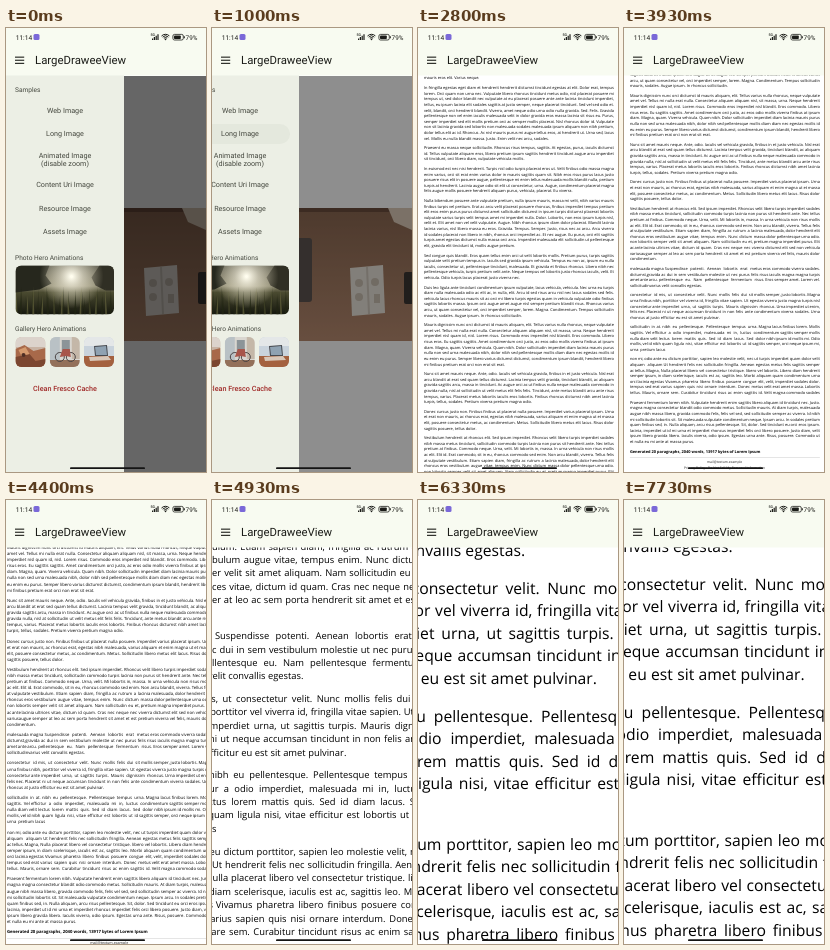
Animation of 200 by 444 pixels, one loop 7.87 s. Source, as an HTML page with a canvas:

```html
<!DOCTYPE html>
<html lang="en">
<head>
<meta charset="utf-8">
<title>LargeDraweeView</title>
<style>
html, body { margin: 0; width: 100%; height: 100%; overflow: hidden; background: #fff; }
canvas { display: block; width: 200px; height: 444px; }
</style>
</head>
<body>
<canvas id="stage"></canvas>
<script>
const W = 200, H = 444, LOOP = 7870, BAR = 47;
const canvas = document.getElementById('stage');
const ctx = canvas.getContext('2d');
const dpr = window.devicePixelRatio || 1;
canvas.width = W * dpr;
canvas.height = H * dpr;
ctx.textRendering = 'geometricPrecision';

const UI = 'Roboto, "Noto Sans", sans-serif';
const BODY = '"Open Sans", "Noto Sans", sans-serif';
const LEFT = 21, RIGHT = 697, MID = 358, LINE = 20, FIRST = 183;
const FIT = 0.281, ZOOM = 1.1225, ZOOM_X = -203, FOCUS_Y = 3063;

// ---------- helpers ----------
const clamp01 = v => Math.max(0, Math.min(1, v));
const lerp = (a, b, u) => a + (b - a) * u;
const span = (t, a, b) => clamp01((t - a) / (b - a));
const ease = {
  in: u => u ** 1.5,
  out: u => 1 - (1 - u) ** 2,
  fling: u => 1 - (1 - u) ** 3,
  both: u => u * u * (3 - 2 * u)
};

function rect(x, y, w, h, color, r = 0) {
  ctx.fillStyle = color;
  ctx.beginPath();
  ctx.roundRect(x, y, w, h, r);
  ctx.fill();
}
function poly(color, ...p) {
  ctx.fillStyle = color;
  ctx.beginPath();
  for (let i = 0; i < p.length; i += 2) ctx.lineTo(p[i], p[i + 1]);
  ctx.fill();
}
function disc(x, y, r, color) {
  ctx.fillStyle = color;
  ctx.beginPath();
  ctx.arc(x, y, r, 0, 7);
  ctx.fill();
}
function label(text, x, y, font, color, align = 'left') {
  ctx.font = font;
  ctx.fillStyle = color;
  ctx.textAlign = align;
  ctx.fillText(text, x, y);
}
function clipped(x, y, w, h, r, draw) {
  ctx.save();
  ctx.beginPath();
  ctx.roundRect(x, y, w, h, r);
  ctx.clip();
  ctx.translate(x, y);
  draw(w, h);
  ctx.restore();
}

// ---------- long page ----------
const counts = [4, 9, 4, 11, 7, 8, 4, 7, 6, 10, 3, 5, 9, 5, 6, 8, 6, 4, 10, 4, 5, 5, 7, 8];
const openers = ['', 'Suspendisse tincidunt arcu nunc, at', 'Nulla quis elit nibh. Morbi cursus',
  'Aenean feugiat sem ac arcu', 'Morbi dolor lacus, hendrerit a', 'In non ex ac est', 'Cras at augue ut ipsum',
  'Proin cras ante, feugiat', 'Praesent a lectus a libero', 'In fringilla egestas eget', 'Praesent eu massa neque',
  'In euismod est nec nisi', 'Nulla bibendum posuere ante', 'Sed congue quis', 'Duis leo ligula', 'Mauris dignissim nunc',
  'Nunc sit amet mauris', 'Donec cursus justo', 'Vestibulum hendrerit', '', '', '', '', 'Praesent fermentum lorem'];
const intro = [
  'Lorem ipsum dolor sit amet, consectetur adipiscing elit. Morbi et quam ac quam dignissim semper vel et',
  'eros. Aenean arcu leo, convallis at tincidunt ac, lobortis et nisi. Nulla vel risus risus non risus semper',
  'imperdiet. Integer tristique elit justo. Quisque eu blandit felis. Pellentesque a dolor id enim finibus',
  'imperdiet. Donec aliquam velit quam, in pretium purus malesuada id.'];

// paragraph: [first line, ...'x | extra word gap | text'], x is where "~" sits at full zoom
const known = {
  18: [4,
    '-45|1.5|vestib~ulum. Etiam sapien diam, fringilla ac rutrum a',
    '-45|1.8|vesti~bulum augue vitae, tempus enim. Nunc dictum',
    '-45|1.2|semp~er velit sit amet aliquam. Nam sollicitudin eu',
    '-45|1.2|ultri~ces vitae, dictum id quam. Cras nec neque nec',
    '-45|.7|semp~er at leo ac sem porta hendrerit sit amet et est'],
  19: [0,
    '-40|6.3|~Suspendisse potenti. Aenean lobortis erat',
    '-45|1|a~c dui in sem vestibulum molestie ut nec purus',
    '-45|6|pe~llentesque eu. Nam pellentesque fermentum',
    '-52|0|~velit convallis egestas.'],
  20: [0,
    '-46|3.3|mi~s, ut consectetur velit. Nunc mollis felis dui',
    '-48|.6|~porttitor vel viverra id, fringilla vitae sapien. Ut',
    '-53|2.8|~imperdiet urna, ut sagittis turpis. Mauris dignissim',
    '-50|1.2|~ni ut neque accumsan tincidunt in non felis',
    '-56.5|.2|~efficitur eu est sit amet pulvinar.'],
  21: [0,
    '-50|4|~nibh eu pellentesque. Pellentesque tempus',
    '-50|4.8|efficit~ur a odio imperdiet, malesuada mi in, luctus',
    '-51|4|le~ctus lorem mattis quis. Sed id diam lacus. Sed',
    '-51|1.9|~quam ligula nisi, vitae efficitur est lobortis ut',
    '-45|0|lacu~s'],
  22: [0,
    '-49|.7|~eu dictum porttitor, sapien leo molestie velit,',
    '-45|.7|~Ut hendrerit felis nec sollicitudin fringilla. Aenean',
    '-56|.6|~Nulla placerat libero vel consectetur tristique.',
    '-50|1.4|~diam scelerisque, iaculis est ac, sagittis leo. Morbi',
    '-38.6|2.7|~Vivamus pharetra libero finibus posuere congue',
    '-48|2.4|v~arius sapien quis nisi ornare interdum. Donec',
    '-46|1.8|orn~are sem. Curabitur tincidunt risus ac enim sagittis']
};
const words = ('ac at eu et id in mi nec non sed sit ut vel amet ante arcu diam elit enim erat eros nibh nisl odio orci ' +
  'quam urna dolor felis ipsum justo lacus lorem magna massa metus neque nulla purus risus velit augue libero mauris ' +
  'mollis semper tellus tempus turpis varius viverra aliquam blandit commodo egestas finibus gravida iaculis lacinia ' +
  'posuere pretium rhoncus sodales dictumst imperdiet vehicula lobortis placerat sagittis tincidunt vulputate ' +
  'consectetur condimentum pellentesque malesuada hendrerit sollicitudin').split(' ');

let seed = 41;
const rnd = () => (seed = (seed * 16807) % 2147483647) / 2147483647;
const cap = s => s[0].toUpperCase() + s.slice(1);
const width = s => ctx.measureText(s).width;
const gaps = s => Math.max(1, s.split(' ').length - 1);

// random words that fit a width with the least stretching
function fill(w, head) {
  let best = '', bestGap = 1e9;
  for (let n = 0; n < 12; n++) {
    let s = head || '', start = false;
    for (;;) {
      let word = words[Math.floor(rnd() * words.length)];
      if (start) word = cap(word);
      const r = rnd();
      start = r < 0.12;
      if (start) word += '.';
      else if (r < 0.22) word += ',';
      const next = s ? s + ' ' + word : word;
      if (s && width(next) > w + 4) break;
      s = next;
    }
    const gap = Math.abs(w - width(s)) / gaps(s);
    if (gap < bestGap) { best = s; bestGap = gap; }
  }
  return best;
}

const pieces = [];
function put(text, x, y, gap = 0) { pieces.push({ text, x, y, gap }); }
function justify(text, x, y, w) { put(text, x, y, (w - width(text)) / gaps(text)); }

function knownLine(entry, y, last) {
  const [x, g, marked] = entry.split('|');
  const text = marked.replace('~', ''), gap = g / ZOOM;
  const x0 = (x - ZOOM_X) / ZOOM - width(marked.split('~')[0]);
  const x1 = x0 + width(text) + gap * (gaps(text) + 1) + 4;
  const lead = x0 - 4 - LEFT;
  if (lead > 12) justify(fill(lead), LEFT, y, lead);
  put(text, x0, y, gap);
  if (!last) justify(fill(RIGHT - x1), x1, y, RIGHT - x1);
}

function layout() {
  ctx.font = '14px ' + BODY;
  let y = FIRST;
  counts.forEach((n, p) => {
    for (let i = 0; i < n; i++, y += LINE) {
      const last = i === n - 1, k = known[p];
      const entry = k && i >= k[0] && k[1 + i - k[0]];
      if (entry) knownLine(entry, y, last && p !== 22);
      else if (p === 0 && !last) justify(intro[i], LEFT, y, RIGHT - LEFT);
      else if (p === 0) put(intro[i], LEFT, y);
      else if (last) {
        const w = p === 18 ? 90 : 150 + rnd() * 420;
        put(fill(w).replace(/[,.]$/, '') + '.', LEFT, y);
      } else justify(fill(RIGHT - LEFT, i ? '' : openers[p]), LEFT, y, RIGHT - LEFT);
    }
    y += 14;
  });
  return y;
}
const endY = layout();

// time, scale, x, y, easing towards this key
const at = (y, k) => y - k * FOCUS_Y;
const keys = [
  [1930, FIT, 0, BAR, 'both'],
  [2800, FIT, 0, BAR - 410, 'fling'],
  [2870, FIT, 0, BAR - 410, 'both'],
  [3500, FIT, 0, at(268.3, FIT), 'both'],
  [4270, FIT, 0, at(268.3, FIT), 'both'],
  [4930, 0.668, -94, at(202.3, 0.668), 'in'],
  [5600, ZOOM, ZOOM_X - 2.5, at(96, ZOOM), 'out'],
  [5900, ZOOM, ZOOM_X - 2.5, at(96, ZOOM), 'both'],
  [7000, ZOOM, ZOOM_X, at(90, ZOOM), 'both']
];
function camera(t) {
  let i = 0;
  while (i < keys.length - 1 && t >= keys[i + 1][0]) i++;
  const a = keys[i], b = keys[Math.min(i + 1, keys.length - 1)];
  const u = a === b ? 0 : ease[b[4]](span(t, a[0], b[0]));
  const k = a[1] * (b[1] / a[1]) ** u;
  const v = a[1] === b[1] ? u : (k - a[1]) / (b[1] - a[1]);
  return { k, x: lerp(a[2], b[2], v), y: lerp(a[3], b[3], v) };
}

function drawPage(t) {
  const c = camera(t);
  ctx.save();
  rect(0, BAR, W, H - BAR, '#fff');
  ctx.translate(c.x, c.y);
  ctx.scale(c.k, c.k);
  const ink = '#000';
  label('Lorem Ipsum', MID, 64, '64px "Liberation Serif", serif', ink, 'center');
  label('"Neque porro quisquam est qui dolorem ipsum quia dolor sit amet, consectetur, adipisci velit..."',
    MID, 112, 'italic 14px ' + BODY, ink, 'center');
  label('"There is no one who loves pain itself, who seeks after it and wants to have it, simply because it is pain..."',
    MID, 136, '11px ' + BODY, ink, 'center');
  rect(LEFT, 150, RIGHT - LEFT, 2, '#ccc');
  ctx.font = '14px ' + BODY;
  ctx.textAlign = 'left';
  ctx.fillStyle = ink;
  for (const p of pieces) {
    const y = c.y + p.y * c.k;
    if (y < BAR - 10 || y > H + 20) continue;
    ctx.wordSpacing = p.gap + 'px';
    ctx.fillText(p.text, p.x, p.y);
  }
  ctx.wordSpacing = '0px';
  label('Generated 20 paragraphs, 2040 words, 13917 bytes of Lorem Ipsum', LEFT, endY, 'bold 14px ' + BODY, ink);
  rect(LEFT, endY + 16, RIGHT - LEFT, 2, '#ccc');
  label('mail@textum.example', MID, endY + 37, '12px ' + BODY, '#222', 'center');
  label('Privacy Policy · Do Not Sell My Personal Information', MID, endY + 58, '12px ' + BODY, '#222', 'center');
  ctx.restore();
}

// ---------- first screen ----------
function drawDesk() {
  rect(0, BAR, W, H - BAR, '#fff');
  clipped(0, 180, W, 133, 0, (w, h) => {
    const g = ctx.createLinearGradient(0, 0, 0, h);
    g.addColorStop(0, '#8a6650');
    g.addColorStop(1, '#b98c70');
    rect(0, 0, w, h, g);
    rect(0, 0, w, 4, '#6b4c3c');
    rect(20, 30, 80, 64, '#5c5350', 3);
    poly('#e9e3da', 138, 60, 171, 57, 173, 105, 140, 108);
    poly('#cfc7bc', 154, 59, 156, 59, 158, 106, 156, 106);
    disc(147, 75, 4, '#cabfb2');
    disc(147, 89, 4, '#cabfb2');
    disc(163, 74, 4, '#cabfb2');
    rect(162, 86, 6, 9, '#cabfb2');
    rect(192, 64, 10, 32, '#3a3432', 2);
    poly('#dccbb8', 176, 0, 200, 0, 200, 22, 182, 14);
  });
}

function drawMeadow(w, h) {
  const g = ctx.createLinearGradient(0, 0, 0, h);
  g.addColorStop(0, '#57564a');
  g.addColorStop(0.42, '#8c8871');
  g.addColorStop(0.55, '#4a4a30');
  g.addColorStop(1, '#15170e');
  rect(0, 0, w, h, g);
  poly('#26271d', 0, 0, 34, 0, 30, 10, 36, 18, 24, 24, 0, 27);
  poly('#302f24', w, 0, 84, 0, 76, 12, 80, 20, 90, 25, w, 25);
  const sun = ctx.createRadialGradient(56, 11, 1, 56, 11, 32);
  sun.addColorStop(0, 'rgba(255,253,238,1)');
  sun.addColorStop(0.35, 'rgba(245,240,220,.6)');
  sun.addColorStop(1, 'rgba(240,232,200,0)');
  rect(0, 0, w, h, sun);
  for (let i = 0; i < 34; i++) {
    const x = i * 3 + Math.sin(i * 9) * 2, top = 26 + 5 * Math.sin(i * 5);
    poly(i % 3 ? '#23261580' : '#7c7a4a80', x, h, x + 1 + Math.sin(i), top, x + 2, h);
  }
}
function drawCanyon(w, h) {
  rect(0, 0, w, h, '#c8b3a4');
  rect(0, 0, w, 10, '#dcd3cc');
  poly('#a8694a', 0, 12, 9, 8, 18, 14, w, 11, w, h, 0, h);
  poly('#7b4630', 0, 20, 14, 17, 20, 24, w, 22, w, h, 0, h);
  poly('#d59a6e', 3, 13, 10, 10, 14, 17, 6, 19);
  disc(8, 18, 2, '#4f2f25');
}
function drawBike(w, h) {
  rect(0, 0, w, h, '#d9d6d0');
  rect(0, 0, 10, 24, '#b9c1c5');
  rect(12, 3, 8, 13, '#8c9498');
  rect(22, 0, 8, 22, '#c4b7a8');
  rect(0, 23, w, 7, '#93705a');
  ctx.strokeStyle = '#4a4444';
  ctx.lineWidth = 1;
  for (const x of [10, 21]) {
    ctx.beginPath();
    ctx.arc(x, 20, 4.5, 0, 7);
    ctx.stroke();
  }
  poly('#a8554a', 10, 20, 13, 12, 20, 12, 21, 20, 16, 19);
}
function drawLaptop(w, h) {
  rect(0, 0, w, h, '#c9d3dc');
  rect(0, 0, w, 9, '#e4e7e8');
  rect(0, 19, w, 11, '#a4613f');
  poly('#474a50', 10, 9, 23, 8, 24, 19, 11, 19);
  poly('#8fa2b2', 11, 10, 22, 9, 23, 18, 12, 18);
  poly('#d8c7b8', 5, 20, 24, 19, 27, 23, 6, 24);
}

const items = [['Web Image', 84.6], ['Long Image', 108.2], ['Animated Image', 129.6], ['(disable zoom)', 137.8],
  ['Content Uri Image', 159.4], ['Resource Image', 183], ['Assets Image', 206.4]];

function drawDrawer(t) {
  const u = ease.both(span(t, 870, 1260));
  if (u >= 1) return;
  rect(0, BAR + 1, W, H, `rgba(0,0,0,${0.6 * (1 - u)})`);
  ctx.save();
  ctx.translate(-118 * u, 0);
  rect(0, BAR, 118, H - BAR, '#ecefe5');
  const press = span(t, 640, 800) * (1 - span(t, 880, 1100));
  if (press) rect(9, 96, 100, 20, `rgba(60,70,50,${0.1 * press})`, 10);
  const head = '6.6px ' + UI, body = '7.2px ' + UI, ink = '#45483f';
  label('Samples', 9, 64, head, ink);
  for (const [text, y] of items) label(text, 59, y, body, ink, 'center');
  label('Photo Hero Animations', 9, 231.6, head, ink);
  clipped(9.5, 237.5, 98.5, 49, 6, drawMeadow);
  label('Gallery Hero Animations', 9, 303.2, head, ink);
  clipped(9.5, 309, 30, 30, 6, drawCanyon);
  clipped(43.8, 309, 30, 30, 6, drawBike);
  clipped(78, 309, 30, 30, 6, drawLaptop);
  label('Clean Fresco Cache', 59, 362.6, '500 7.2px ' + UI, '#a02a28', 'center');
  ctx.restore();
}

function drawBars() {
  const ink = '#1b1c18';
  rect(0, 0, W, BAR + 0.5, '#f8fbf1');
  label('11:14', 9.7, 11.5, '6.6px ' + UI, ink);
  rect(27.5, 6, 6, 6, '#7a68d8', 1.5);
  label('5G', 144.5, 8.4, '500 3.6px ' + UI, ink);
  for (let i = 0; i < 4; i++) rect(146 + i * 1.8, 10.5 - i * 1.4, 1.2, 1.5 + i * 1.4, ink);
  ctx.strokeStyle = ink;
  ctx.lineWidth = 1;
  for (const r of [2.2, 3.9, 5.5]) {
    ctx.beginPath();
    ctx.arc(159.5, 11.8, r, -Math.PI * 0.76, -Math.PI * 0.24);
    ctx.stroke();
  }
  disc(159.5, 11.4, 0.8, ink);
  ctx.lineWidth = 0.8;
  ctx.beginPath();
  ctx.roundRect(166.9, 6.4, 10.4, 5.6, 1.6);
  ctx.stroke();
  rect(168, 7.4, 6.8, 3.6, ink, 0.8);
  rect(177.9, 8.2, 0.9, 2, ink);
  label('79%', 179.6, 11.6, '6.4px ' + UI, ink);
  for (const y of [28.6, 31.7, 34.8]) rect(9, y, 9.2, 1.1, ink);
  label('LargeDraweeView', 29, 36.2, '11.4px ' + UI, ink);
}

function draw(t) {
  ctx.setTransform(dpr, 0, 0, dpr, 0, 0);
  ctx.globalAlpha = 1;
  if (t < 1300) drawDesk();
  if (t >= 1000) {
    ctx.globalAlpha = span(t, 1000, 1300);
    drawPage(t);
    ctx.globalAlpha = 1;
  }
  drawDrawer(t);
  drawBars();
  rect(64, 439.3, 75, 1.8, '#141414', 0.9);
}

const begin = performance.now();
function tick() {
  draw((performance.now() - begin) % LOOP);
  requestAnimationFrame(tick);
}
tick();
</script>
</body>
</html>
```
